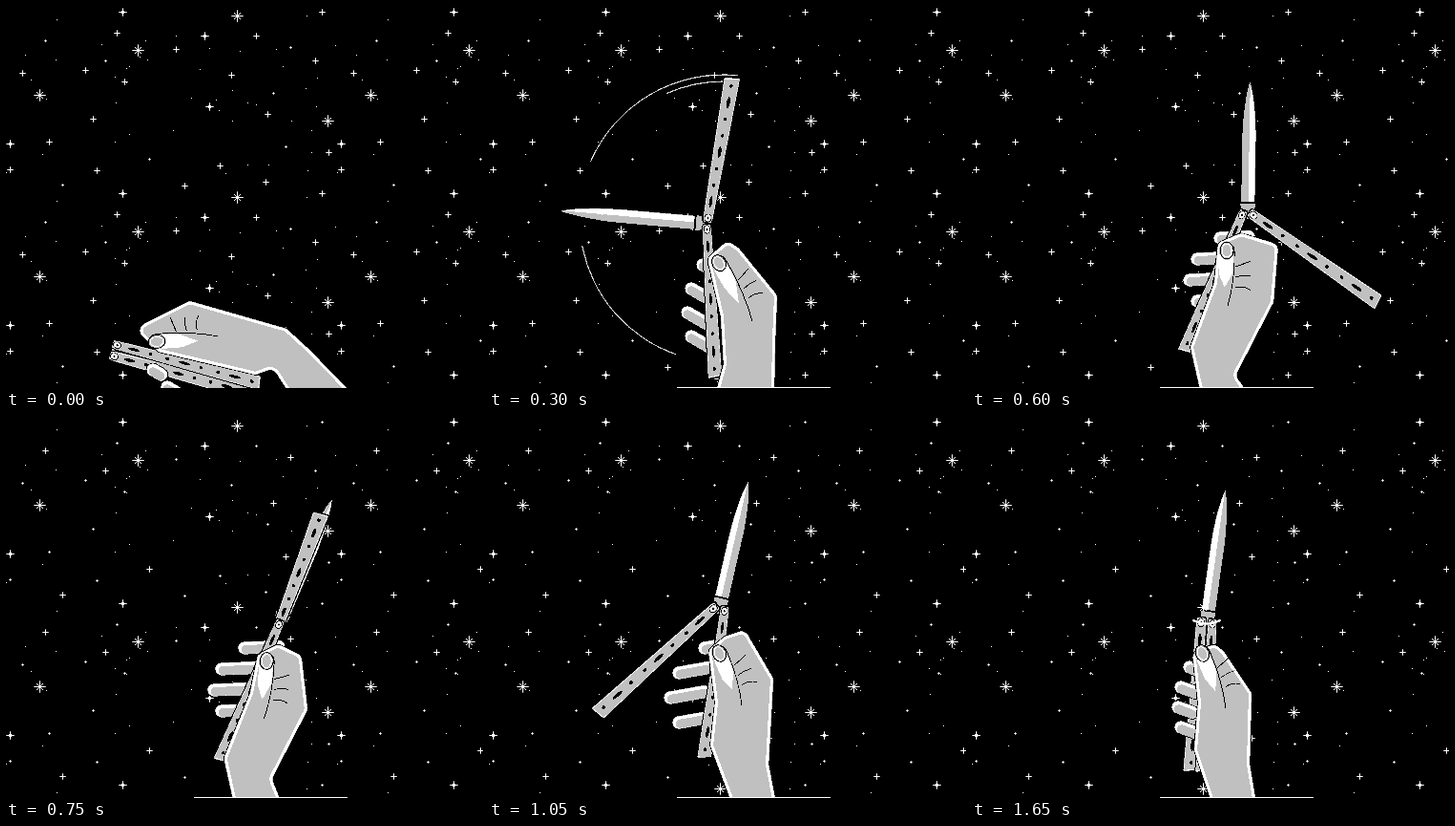
An HTML page with a canvas that plays this animation: 500 by 400 pixels, repeating every 1.8 s.

```html
<!DOCTYPE html>
<html lang="en">
<head>
<meta charset="utf-8">
<title>Butterfly knife</title>
<style>
html, body { margin: 0; height: 100%; overflow: hidden; background: #000 }
canvas { display: block }
</style>
</head>
<body>
<canvas id="stage" width="500" height="400"></canvas>
<script>
const ctx = document.getElementById('stage').getContext('2d', { willReadFrequently: true });
const GREY = '#c0c0c0', WHITE = '#fff', BLACK = '#000';
const STEP = 150, COUNT = 12, FLASH = 6;
const rad = degrees => degrees * Math.PI / 180;

// ---- Star field: one repeated tile; two groups of stars twinkle in turn ----
const TILE_W = 347, TILE_H = 190;
const bigStars = [[35, 93], [138, 46], [242, 10], [337, 120]];
const steadyStars = [[122, 6], [208, 31], [213, 105], [4, 144]];
const twinkles = [
  [[331, 6], [116, 28], [262, 31], [178, 45], [324, 57], [83, 67], [17, 70], [124, 79], [236, 72],
    [274, 113], [91, 118], [45, 142], [338, 153], [224, 167], [4, 171], [95, 172], [272, 184], [187, 188]],
  [[41, 36], [104, 57], [298, 43], [280, 91], [293, 147], [59, 187], [150, 160]]
];
let seed = 7;
const random = () => (seed = seed * 16807 % 2147483647) / 2147483647;
const dust = Array.from({ length: 45 }, () => [random() * TILE_W | 0, random() * TILE_H | 0]);

function star(x, y, arm, diagonal) {
  for (let i = -arm; i <= arm; i++) {
    ctx.fillStyle = arm && Math.abs(i) === arm ? '#999' : WHITE;
    ctx.fillRect(x + i, y, 1, 1);
    ctx.fillRect(x, y + i, 1, 1);
    if (Math.abs(i) > diagonal) continue;
    ctx.fillRect(x + i, y + i, 1, 1);
    ctx.fillRect(x + i, y - i, 1, 1);
  }
}

function sky(phase) {
  const layers = [[bigStars, 6, 3], [steadyStars, 4, 1], [twinkles[phase], 3, 0], [twinkles[1 - phase], 1, 0], [dust, 0, 0]];
  for (let top = 0; top < 400; top += TILE_H)
    for (let left = 0; left < 500; left += TILE_W)
      for (const [list, arm, diagonal] of layers)
        for (const [x, y] of list) star(x + left, y + top, arm, diagonal);
}

// ---- Drawing helpers ----
function fill(path, color, edge) {
  path = new Path2D(path);
  ctx.fillStyle = color;
  ctx.fill(path);
  if (edge) line(path, edge);
}
function line(path, color, width = 1) {
  ctx.strokeStyle = color;
  ctx.lineWidth = width;
  ctx.stroke(new Path2D(path));
}
function ellipse(x, y, rx, ry = rx) {
  const path = new Path2D();
  path.ellipse(x, y, rx, ry, 0, 0, 7);
  return path;
}
// Runs paint() with its origin at x, y and its x axis turned by the angle.
function at(x, y, angle, paint) {
  ctx.save();
  ctx.translate(x, y);
  ctx.rotate(rad(angle));
  paint();
  ctx.restore();
}

// ---- Knife ----
function handle(x, y, angle, length, breadth, color) {
  at(x, y, angle, () => {
    ctx.scale(length / 147, breadth);
    const shape = 'M-4,-4L0,-5L146,-9L148,8L0,5L-4,4Z';
    line(shape, BLACK, 4);
    fill(shape, color, WHITE);
    for (let i = 0; i < 8; i++) fill(ellipse(17 + 17.5 * i, 0, i % 3 ? 2 : 6, 2), BLACK);
    fill(ellipse(0, 0, 4), WHITE, BLACK);
    fill(ellipse(0, 0, 1.2), BLACK);
  });
}

function blade([x, y], [angle, length], litSide) {
  at(x, y, angle, () => {
    fill('M-4,-5L12,-8V8L-4,5Z', GREY);
    for (const s of [-1, 1])
      fill(`M14,0V${7 * s}L${length * .6},${7 * s}Q${length * .85},${6 * s} ${length},0Z`,
        litSide === 0 || s === litSide ? WHITE : GREY);
  });
}

// ---- Hand ----
function roundedShape(flat) {
  const path = new Path2D(), last = flat.length - 2;
  path.moveTo(flat[0], flat[1]);
  for (let i = 2; i < last; i += 2) path.arcTo(flat[i], flat[i + 1], flat[i + 2], flat[i + 3], 8);
  path.lineTo(flat[last], flat[last + 1]);
  return path;
}

// The four fingertips lie on a parabola, the third reaching furthest.
function fingers([x, y, gap, bulge, angle, length]) {
  for (let i = 0; i < 4; i++)
    at(x + 6 + bulge * (i - 2) ** 2, y + gap * i, angle, () => {
      line(`M0,0H${length}`, BLACK, 15);
      line(`M0,0H${length}`, WHITE, 13);
      line(`M1,1.5H${length}`, GREY, 9);
    });
}

function palm(points) {
  const shape = roundedShape(points);
  line(shape, BLACK, 2);
  fill(shape, GREY);
  ctx.save();
  ctx.clip(shape);
  line(shape, WHITE, 6);
  ctx.restore();
}

function thumb([x, y, tipX, tipY]) {
  const length = Math.hypot(tipX - x, tipY - y);
  at(x, y, Math.atan2(tipY - y, tipX - x) / rad(1), () => {
    const side = `Q${length * .4},8 ${length - 8},8Q${length + 2},8 ${length},0`;
    fill(`M0,0${side}Q${length + 2},-8 ${length - 8},-8H${length - 30}Z`, GREY);
    fill(`M${length * .3},-3L${length - 32},-8H${length - 10}V7H${length - 28}Z`, WHITE);
    line(`M0,0${side}`, BLACK);
    for (let i = 0; i < 3; i++) line(`M${length * .3 + 11 * i},9q2,7 ${4 * i - 3},15`, BLACK);
    fill(ellipse(length - 6, 0, 9, 7), GREY, BLACK);
    line(ellipse(length - 6, 0, 7, 5), WHITE);
  });
}

// palm: outline from wrist to wrist; fingers: tip x, y, gap, bulge, angle, length
const reach = {
  palm: [294, 401, 280, 379, 262, 386, 160, 362, 135, 338, 192, 309, 294, 338, 320, 362, 358, 401],
  thumb: [222, 346, 152, 352], fingers: [148, 345, 18, 15, 30, 10]
};
const grip = {
  palm: [239, 401, 246, 375, 243, 325, 229, 264, 250, 246, 262, 254, 302, 303, 300, 350, 299, 401],
  thumb: [276, 330, 238, 264], fingers: [202, 271, 25, 4, 30, 25]
};
const open = {
  palm: [239, 401, 229, 357, 254, 290, 258, 248, 282, 238, 321, 250, 316, 310, 276, 387, 286, 401],
  thumb: [268, 314, 267, 250], fingers: [222, 243, 22, 8, -3, 30]
};
const spread = {
  palm: [237, 401, 228, 360, 258, 290, 270, 252, 288, 240, 298, 252, 316, 305, 281, 373, 288, 401],
  thumb: [273, 320, 280, 251], fingers: [202, 243, 22, 8, -2, 42]
};
const turned = {
  palm: [253, 401, 232, 345, 237, 300, 230, 245, 247, 231, 268, 224, 298, 275, 293, 365, 300, 401],
  thumb: [265, 303, 239, 243], fingers: [184, 243, 26, 9, -10, 36]
};
const fist = {
  palm: [250, 401, 233, 350, 237, 300, 231, 247, 255, 239, 264, 247, 293, 290, 291, 365, 297, 401],
  thumb: [266, 306, 239, 243], fingers: [210, 263, 21, 3, 20, 16]
};

// ---- Key poses; held is an angle, swing and blade are angle and length ----
const keys = [
  { step: 0, hand: reach, hinge: [115, 361], held: 15, swing: [15, 147], blade: [15, 130], side: 1 },
  { step: 2, hand: grip, hinge: [229, 228], held: 87, swing: [-80, 148], blade: [185, 155], side: 1 },
  { step: 4, hand: open, hinge: [289, 219], held: 113, swing: [35, 159], blade: [271, 140], side: 1 },
  { step: 6, hand: spread, hinge: [283, 218], held: 114, swing: [-173, 88], blade: [315, 146], side: -1 },
  { step: 7, hand: turned, hinge: [241, 203], held: 98, swing: [-222, 163], blade: [283, 139], side: -1 },
  { step: 9, hand: fist, hinge: [246, 219], held: 94, swing: [-266, 155], blade: [278, 141], side: -1 },
  { step: 11, hand: fist, hinge: [246, 217], held: 94, swing: [-266, 155], blade: [278, 141], side: -1 }
];

// Blends numbers, arrays and objects alike.
function mix(a, b, t) {
  if (typeof a === 'number') return a + (b - a) * t;
  if (Array.isArray(a)) return a.map((value, i) => mix(value, b[i], t));
  return Object.fromEntries(Object.keys(a).map(name => [name, mix(a[name], b[name], t)]));
}
function poseAt(step) {
  const next = Math.max(1, keys.findIndex(key => key.step >= step));
  const a = keys[next - 1], b = keys[next];
  return mix(a, b, (step - a.step) / (b.step - a.step));
}

// ---- Light effects ----
function trails() {
  for (const [radius, from, to] of [[151, 203.5, 276], [144, 246, 270], [150, 109, 169]]) {
    const arc = new Path2D();
    arc.arc(245, 223, radius, rad(from), rad(to));
    line(arc, WHITE);
  }
}
function glint() {
  fill(ellipse(330, 171, 6), WHITE);
  for (let i = 0; i < 12; i++)
    at(330, 171, 30 * i + 8, () => fill(`M0,-3L12,-.6H${28 + 7 * (i % 3)}V.6H12L0,3Z`, WHITE));
}

// Reduces the picture to black, grey and white for the pixel look.
function posterise() {
  const image = ctx.getImageData(0, 0, 500, 400), px = image.data;
  for (let i = 0; i < px.length; i += 4)
    px[i] = px[i + 1] = px[i + 2] = px[i] < 90 ? 0 : px[i] < 222 ? 192 : 255;
  ctx.putImageData(image, 0, 0);
}

function draw(step) {
  const { hand, hinge, held, swing, blade: edge, side } = poseAt(step);
  const [x, y] = hinge, metal = step === FLASH ? WHITE : GREY;
  const offX = -6 * side * Math.sin(rad(edge[0])), offY = 6 * side * Math.cos(rad(edge[0]));
  ctx.fillStyle = BLACK;
  ctx.fillRect(0, 0, 500, 400);
  sky(step % 2);
  ctx.lineCap = ctx.lineJoin = 'round';
  if (step === 2) trails();
  blade(hinge, edge, step === FLASH ? 0 : side < 0 ? -1 : 1);
  handle(x + offX, y + offY, ...swing, .9, metal);
  fingers(hand.fingers);
  handle(x - offX, y - offY, held, 154, .8, metal);
  palm(hand.palm);
  thumb(hand.thumb);
  if (step === FLASH) glint();
  if (step >= 9) line(`M${x - 14},${y - 3}q14,7 28,0`, WHITE, 2);
  if (step) {
    ctx.fillStyle = WHITE;
    ctx.fillRect(197, 399, 161, 1);
  }
  posterise();
}

let shown = -1;
function tick() {
  const step = Math.floor(performance.now() / STEP) % COUNT;
  if (step !== shown) draw(shown = step);
  requestAnimationFrame(tick);
}
tick();
</script>
</body>
</html>
```
